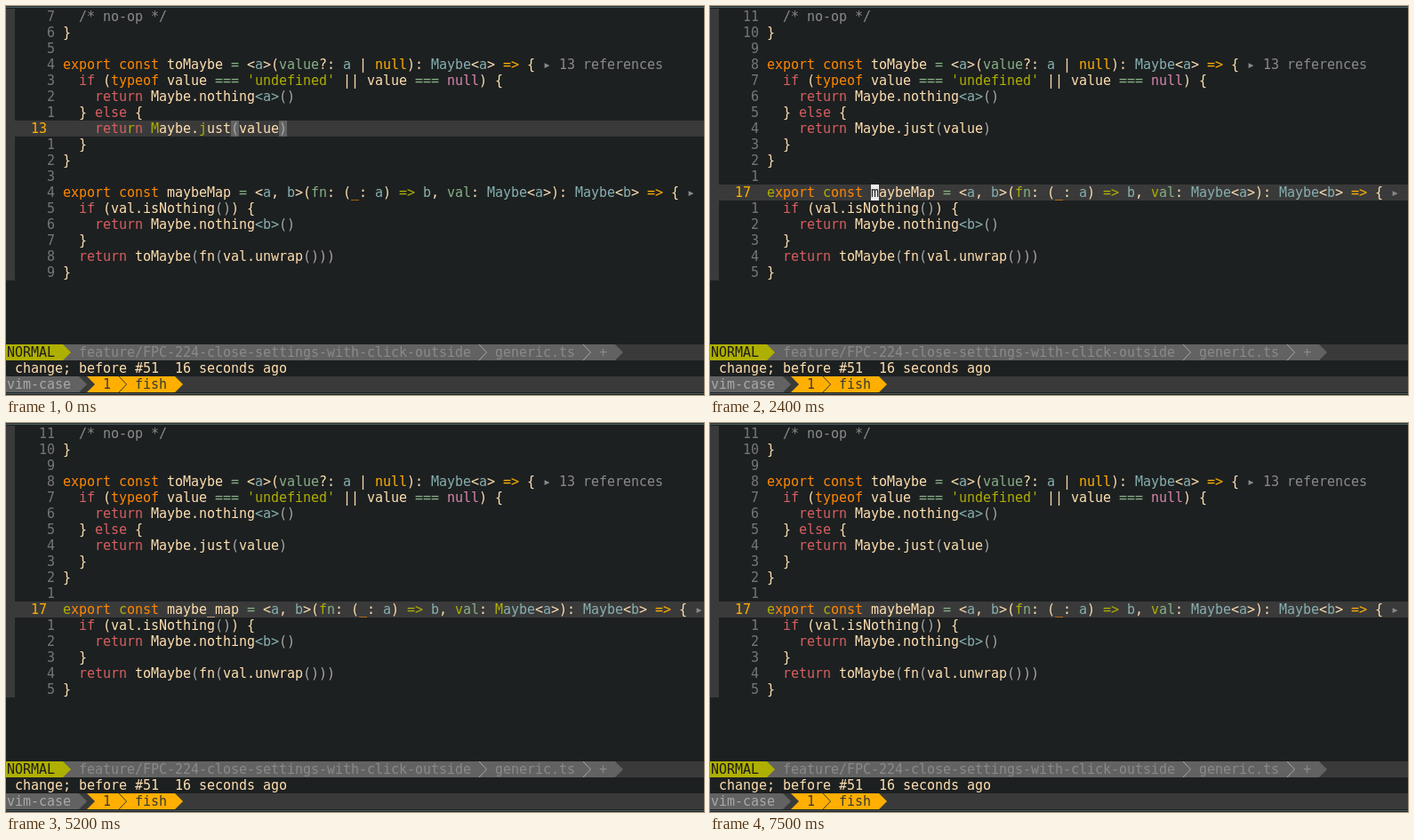
Write an HTML page with a canvas that moves like this. It is 785 px wide and 438 px high and loops after 8 s.

```html
<!DOCTYPE html>
<html lang="en">
<head>
<meta charset="utf-8">
<title>vim-case</title>
<style>
html, body { margin: 0; width: 100%; height: 100%; overflow: hidden; background: #1d2021; }
canvas { display: block; }
</style>
</head>
<body>
<canvas id="stage" width="785" height="438"></canvas>
<script>
const ctx = document.getElementById('stage').getContext('2d');
const W = 785, H = 438, CELL = 9, ROW = 18, TOP = 3, LEFT = 1, CODE = 7;
const LOOP = 8000, FIRST_LINE = 6;
const BG = '#1d2021', BAR = '#3a3a3a', MID = '#626262', OLIVE = '#afaf00', YELLOW = '#ffaf00';

const colors = {
  f: '#ffdfaf', o: '#ff8700', r: '#d75f5f', g: OLIVE, y: YELLOW,
  b: '#87afaf', a: '#87af87', p: '#d787af', c: '#8a8a8a', s: '#a8a8a8'
};

// "~x" switches to colour x; NAME is filled in per state
const source = [
  '  ~c/* no-op */',
  '~f}',
  '',
  '~oexport const ~ftoMaybe ~a= ~f<~ba~f>(~avalue~f?: ~ba ~f| ~ynull~f): ~bMaybe~f<~ba~f> ~y=> ~f{ ~c▸ 13 references',
  '  ~rif ~f(~otypeof ~fvalue ~a=== ~g\'undefined\' ~f|| value ~a=== ~pnull~f) {',
  '    ~rreturn ~fMaybe.nothing~b<a>~s()',
  '  ~f} ~relse ~f{',
  '    ~rreturn ~fMaybe.just~s(~fvalue~s)',
  '  ~f}',
  '~f}',
  '',
  '~oexport const ~fNAME ~a= ~f<~ba~f, ~bb~f>(~afn~f: (~o_~f: ~ba~f) ~g=> ~bb~f, ~aval~f: ~bMaybe~f<~ba~f>): ~bMaybe~f<~bb~f> ~y=> ~f{ ~c▸ 2 references',
  '  ~rif ~f(val.isNothing~s()~f) {',
  '    ~rreturn ~fMaybe.nothing~b<b>~s()',
  '  ~f}',
  '  ~rreturn ~ftoMaybe~s(~ffn~s(~fval.unwrap~s()))',
  '~f}'
];

const camel = 'maybeMap', snake = 'maybe_map';
// time, line, column, cursor lit, identifier
const steps = [
  [0, 13, 27, 0, camel], [400, 13, 27, 1, camel], [900, 13, 27, 0, camel],
  [1000, 17, 27, 1, camel], [1300, 17, 76, 1, camel], [1400, 17, 0, 1, camel],
  [2000, 17, 0, 0, camel], [2300, 17, 7, 1, camel], [2400, 17, 13, 1, camel],
  [2800, 17, 13, 0, camel], [3500, 17, 13, 1, camel], [4000, 17, 13, 0, camel],
  [4400, 17, 13, 1, camel], [4700, 17, 13, 1, snake], [5200, 17, 13, 0, snake],
  [5500, 17, 13, 1, snake], [6000, 17, 13, 0, snake], [6500, 17, 13, 1, snake],
  [6900, 17, 13, 0, snake], [7000, 17, 13, 1, camel], [7500, 17, 13, 0, camel]
];

const rowTop = row => TOP + row * ROW;
const colX = col => LEFT + col * CELL;

function rect(x, y, w, h, color) {
  ctx.fillStyle = color;
  ctx.fillRect(x, y, w, h);
}

function glyph(ch, col, row, color) {
  if (ch === ' ') return;
  ctx.fillStyle = color;
  ctx.fillText(ch, colX(col), rowTop(row) + 14);
}

function text(str, col, row, color) {
  [...str].forEach((ch, i) => glyph(ch, col + i, row, color));
}

function cell(col, row, color) {
  rect(colX(col), rowTop(row), CELL, ROW, color);
}

function wedge(x, row, color) {
  const y = rowTop(row);
  ctx.fillStyle = color;
  ctx.beginPath();
  ctx.moveTo(x, y);
  ctx.lineTo(x + CELL, y + ROW / 2);
  ctx.lineTo(x, y + ROW);
  ctx.fill();
}

function chevron(x, row, color) {
  const y = rowTop(row);
  ctx.strokeStyle = color;
  ctx.lineWidth = 1;
  ctx.beginPath();
  ctx.moveTo(x, y);
  ctx.lineTo(x + CELL - 0.5, y + ROW / 2);
  ctx.lineTo(x, y + ROW);
  ctx.stroke();
}

function parse(line, name) {
  const out = [];
  let color = colors.f;
  const str = line.replace('NAME', name);
  for (let i = 0; i < str.length; i++) {
    if (str[i] === '~') color = colors[str[++i]];
    else out.push({ ch: str[i], color });
  }
  return out;
}

// Marks one letter per word whose first sighting from the cursor is there
function markJumps(chars, col) {
  const end = chars.findIndex(c => c.ch === '▸');
  const limit = end < 0 ? chars.length : end;
  for (const dir of [1, -1]) {
    const seen = {};
    let first = true, pick = -1;
    for (let i = col + dir; ; i += dir) {
      const inside = i >= 0 && i < limit;
      const ch = inside ? chars[i].ch : ' ';
      if (/\w/.test(ch)) {
        seen[ch] = (seen[ch] || 0) + 1;
        if (seen[ch] === 1 && ch !== '_' && (dir < 0 || pick < 0)) pick = i;
      } else {
        if (!first && pick >= 0) chars[pick].color = OLIVE;
        first = false;
        pick = -1;
      }
      if (!inside) break;
    }
  }
}

function drawCode(line, col, lit, name) {
  const cur = line - FIRST_LINE;
  rect(0, rowTop(0), 10, source.length * ROW, BAR);
  rect(0, rowTop(cur), W, ROW, BAR);

  if (line === 13) {
    cell(CODE + 21, cur, MID);
    cell(CODE + 27, cur, MID);
  } else if (col === 76) {
    cell(CODE + 76, cur, MID);
    cell(CODE, 16, MID);
  }

  source.forEach((src, row) => {
    const chars = parse(src, name);
    if (row === cur) {
      markJumps(chars, col);
      text(String(line), 3, row, YELLOW);
    } else {
      const num = String(Math.abs(row - cur));
      text(num, 6 - num.length, row, '#767676');
    }
    chars.slice(0, 80).forEach((c, i) => glyph(c.ch, CODE + i, row, c.color));
    if (row === cur && lit) {
      cell(CODE + col, row, '#ebebeb');
      glyph(chars[col].ch, CODE + col, row, BG);
    }
  });
}

function drawBars() {
  const st = 21, tm = 23, dim = '#8a8a8a';
  rect(0, rowTop(st), W, ROW, BAR);
  rect(0, rowTop(st), 685, ROW, MID);
  wedge(685, st, MID);
  rect(0, rowTop(st), 64, ROW, OLIVE);
  wedge(64, st, OLIVE);
  text('NORMAL', 0, st, '#1c1c1c');
  text('feature/FPC-224-close-settings-with-click-outside', 9, st, dim);
  chevron(532, st, '#a8a8a8');
  text('generic.ts', 61, st, dim);
  chevron(649, st, '#a8a8a8');
  text('+', 74, st, dim);

  text('change; before #51  16 seconds ago', 1, 22, colors.f);

  rect(0, rowTop(tm), W, ROW, BAR);
  rect(0, rowTop(tm), 82, ROW, MID);
  wedge(82, tm, MID);
  text('vim-case', 0, tm, '#a8a8a8');
  rect(91, rowTop(tm), 99, ROW, YELLOW);
  wedge(91, tm, BAR);
  wedge(190, tm, YELLOW);
  text('1', 12, tm, BAR);
  chevron(127, tm, BAR);
  text('fish', 16, tm, BAR);
}

function draw(t) {
  const [, line, col, lit, name] = steps.filter(s => s[0] <= t).pop();
  ctx.font = '15px "DejaVu Sans Mono", monospace';
  rect(0, 0, W, H, BG);
  rect(0, 0, W, 1, '#2b3436');
  rect(0, 1, W, 1, '#4d5f61');
  drawCode(line, col, lit, name);
  drawBars();
  rect(0, 436, W, 1, '#4d5f61');
}

const start = performance.now();
function tick() {
  draw((performance.now() - start) % LOOP);
  requestAnimationFrame(tick);
}
tick();
</script>
</body>
</html>
```
